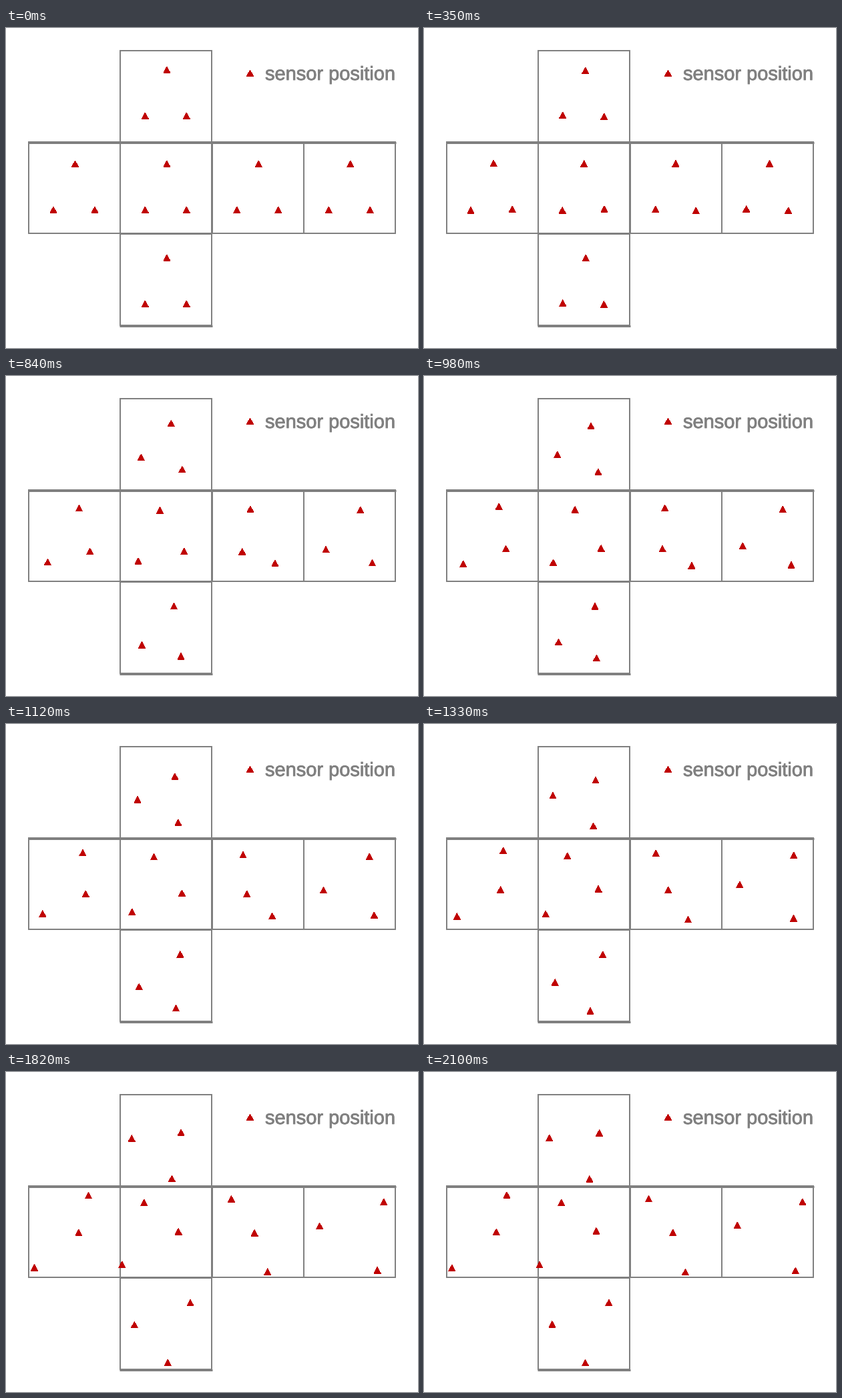
A matplotlib script for the animation above (2170 ms loop, 617 by 480 pixels).

```python
import matplotlib.pyplot as plt
import numpy as np
from matplotlib.animation import FuncAnimation
from matplotlib.collections import PolyCollection
from matplotlib.patches import Rectangle
from matplotlib.patheffects import withStroke

W, H, DPI = 617, 480, 100
FRAMES, STEP = 31, 70
GREY, RED = "#808080", "#c00000"
PX = 72 / DPI
LEFT, TOP, SIDE, PITCH = 34, 171, 137, 137.4

# column and row of each face in the unfolded cube,
# with the headings (degrees, clockwise from right) of its three sensors
NET = {
    (1, -1): (53, 238, 128),
    (0, 0): (317, 144, 233),
    (1, 0): (193, 155, 250),
    (2, 0): (198, 310, 121),
    (3, 0): (350, 252, 66),
    (1, 1): (2, 245, 142),
}
# every face starts with the same group: apex, lower left, lower right
GROUP = np.array([(1, -34), (-31.5, 35), (30.5, 35)])
# travel distance in the first column, and its change per column
REACH, GROWTH = np.array([28, 36, 41]), np.array([8, 3, -4.5])

MARK = np.array([(0, -4.8), (4.9, 4.5), (-4.9, 4.5)])


def ease(t):
    a, b = t ** 2.07, (1 - t) ** 2
    return a / (a + b)


def group_path(col, row, headings):
    """Start points and total drift of the three sensors on one face."""
    start = GROUP + (102.5 + PITCH * col, 238 + 141 * row)
    angle = np.radians(headings)
    reach = REACH + GROWTH * col
    return start, reach[:, None] * np.column_stack([np.cos(angle), np.sin(angle)])


def triangles(centres):
    return np.asarray(centres)[:, None, :] + MARK


def marker_set(centres):
    marks = PolyCollection(triangles(centres), facecolor=RED, edgecolor="none",
                           antialiased=False, zorder=3)
    ax.add_collection(marks)
    return marks


fig = plt.figure(figsize=(W / DPI, H / DPI), dpi=DPI, facecolor="white")
ax = fig.add_axes([0, 0, 1, 1])
ax.set(xlim=(0, W), ylim=(H, 0))
ax.axis("off")

for col, row in NET:
    corner = round(LEFT + PITCH * col), round(TOP + PITCH * row)
    # the lowest face sits one pixel clear of the row above
    corner = corner[0], corner[1] + (row > 0)
    ax.add_patch(Rectangle(corner, SIDE, SIDE, fill=False, ec=GREY, lw=2 * PX))

# heavier top edge of the middle row and bottom edge of the net
for y, x0, x1 in ((171.5, 33, 584), (446.5, 170, 309)):
    ax.plot([x0, x1], [y, y], color=GREY, lw=3 * PX, solid_capstyle="butt")

marker_set([(365.5, 68)])
ax.text(388, 78, "sensor position", family="Liberation Sans", size=29 * PX,
        color=GREY, va="baseline",
        path_effects=[withStroke(linewidth=0.8 * PX, foreground=GREY)])

paths = [group_path(*cell, headings) for cell, headings in NET.items()]
start, drift = (np.concatenate(part) for part in zip(*paths))
sensors = marker_set(start)


def update(i):
    sensors.set_verts(triangles(start + drift * ease(i / (FRAMES - 1))))
    return [sensors]


anim = FuncAnimation(fig, update, frames=FRAMES, interval=STEP, repeat=True,
                     repeat_delay=0)
plt.show()
```
